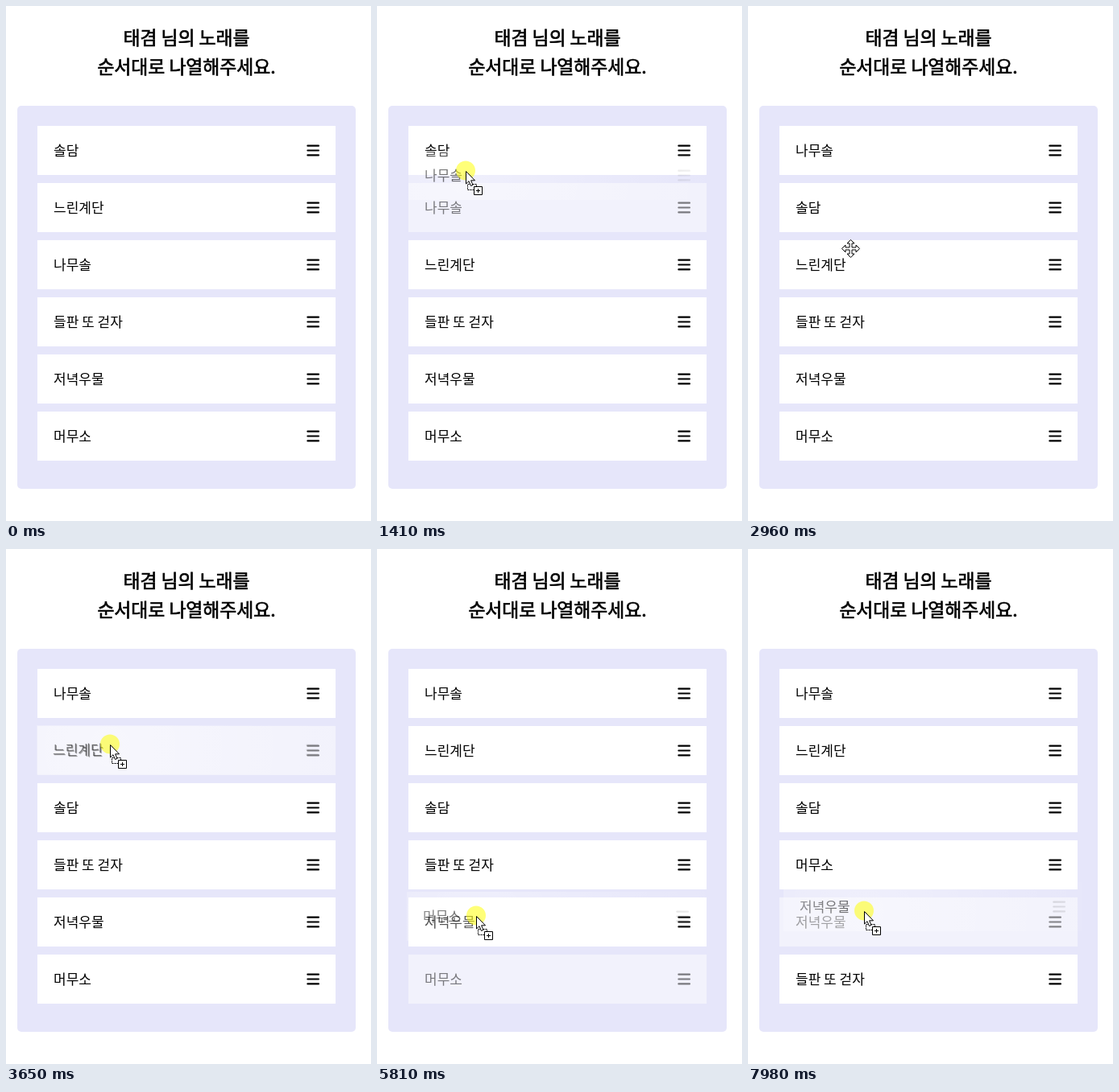
An HTML page with a canvas for the animation above (8 s loop, 453 by 640 pixels).

```html
<!DOCTYPE html>
<html lang="ko">
<head>
<meta charset="utf-8">
<title>노래 순서 정하기</title>
<style>
  html, body { margin: 0; width: 100%; height: 100%; overflow: hidden; background: #fff; }
  canvas { display: block; }
</style>
</head>
<body>
<canvas id="stage" width="453" height="640"></canvas>
<script>
const ctx = document.getElementById('stage').getContext('2d');
const FONT = '"Noto Sans CJK KR", "Noto Sans CJK", "Noto Sans CJK JP", sans-serif';
const LOOP = 8000;
const STEP = 67.4;  // the pointer is sampled at this interval
const LAG = 20;     // the dragged copy trails the pointer
const LIFT = 40;    // from the first pull to the visible drag
const HOLD = 330;   // from the end of a drag to its drop
const ROW = { x: 39, y: 149, w: 370, h: 61, pitch: 71 };
const SONGS = ['솔담', '느린계단', '나무솔', '들판 또 걷자', '저녁우물', '머무소'];

// Pointer moves; `lift` is the row that a move drags along
const ENTRY = { x: 420, y: 645 };
const MOVES = [
  { start: 120, end: 740, x: 110, y: 320 },
  { start: 970, end: 1950, x: 110, y: 164, lift: 2 },
  { start: 2560, end: 3200, x: 130, y: 318 },
  { start: 3400, end: 3780, x: 129, y: 233, lift: 2 },
  { start: 4080, end: 4780, x: 143, y: 382 },
  { start: 4800, end: 5470, x: 125, y: 542 },
  { start: 5630, end: 6210, x: 121, y: 378, lift: 5 },
  { start: 6490, end: 7280, x: 139, y: 541 },
  { start: 7310, end: 8050, x: 144, y: 449, lift: 5 }
];

const rowTop = i => ROW.y + i * ROW.pitch;
const rowMiddle = i => rowTop(i) + ROW.h / 2;
const sampled = t => Math.floor(t / STEP + 0.4) * STEP;
const easeOut = p => 1 - (1 - p) ** 2.2;

function pointerAt(t) {
  let { x, y } = ENTRY;
  for (const move of MOVES) {
    if (t < move.start) break;
    const k = easeOut(Math.min(1, (t - move.start) / (move.end - move.start)));
    x += (move.x - x) * k;
    y += (move.y - y) * k;
  }
  return { x, y };
}

// Replays the drags up to time t; a row moves up when the pointer passes a row's middle
function listAt(t) {
  const songs = [...SONGS];
  let active = null, slot = -1;
  for (const move of MOVES) {
    if (move.lift === undefined) continue;
    if (t < move.start + LIFT) break;
    const { y } = pointerAt(Math.min(sampled(t) - LAG, move.end));
    slot = move.lift;
    while (slot > 0 && y < rowMiddle(slot - 1)) slot--;
    songs.splice(slot, 0, songs.splice(move.lift, 1)[0]);
    active = t < move.end + HOLD ? move : null;
  }
  return { songs, active, slot };
}

function roundBox(x, y, w, h, r, fill) {
  ctx.fillStyle = fill;
  ctx.beginPath();
  ctx.roundRect(x, y, w, h, r);
  ctx.fill();
}

function drawTitle(text, y) {
  ctx.font = '22.8px ' + FONT;
  ctx.textAlign = 'center';
  ctx.fillStyle = ctx.strokeStyle = '#000';
  ctx.lineWidth = 0.7;
  ctx.fillText(text, 224, y);
  ctx.strokeText(text, 224, y);
}

function drawRow(song, x, y, paper, ink) {
  ctx.fillStyle = paper;
  ctx.fillRect(x, y, ROW.w, ROW.h);
  ctx.fillStyle = ink;
  ctx.font = '17px ' + FONT;
  ctx.textAlign = 'left';
  ctx.fillText(song, x + 20, y + 37);
  for (const line of [-1, 0, 1])
    roundBox(x + 334.3, y + 29.4 + line * 5.8, 15.7, 2.2, 1, ink);
}

function fade({ x, y }, rgb, strength) {
  const gradient = ctx.createRadialGradient(x, y, 0, x, y, 320);
  for (let r = 0; r <= 1; r += 0.25)
    gradient.addColorStop(r, `rgba(${rgb},${strength * (1 - r) ** 1.2})`);
  return gradient;
}

function outline(points) {
  ctx.beginPath();
  points.forEach(([x, y]) => ctx.lineTo(x, y));
  ctx.closePath();
  ctx.fillStyle = '#fff';
  ctx.strokeStyle = '#000';
  ctx.lineWidth = 1;
  ctx.fill();
  ctx.stroke();
}

function drawMoveCursor() {
  const arm = [[-1.5, -1.5], [-1.5, -6.5], [-4.5, -6.5], [0, -11], [4.5, -6.5], [1.5, -6.5]];
  const points = [];
  for (let turn = 0; turn < 4; turn++) {
    const c = Math.cos(turn * Math.PI / 2), s = Math.sin(turn * Math.PI / 2);
    arm.forEach(([x, y]) => points.push([x * c - y * s, x * s + y * c]));
  }
  outline(points);
}

function drawDragCursor() {
  ctx.fillStyle = 'rgba(255,255,0,.53)';
  ctx.beginPath();
  ctx.arc(0, -0.5, 12, 0, 7);
  ctx.fill();
  ctx.strokeStyle = '#000';
  ctx.lineWidth = 1;
  ctx.setLineDash([2, 1]);
  ctx.strokeRect(2.5, 16.5, 11, 7);
  ctx.setLineDash([]);
  outline([[0.5, 0.5], [0.5, 16], [4, 12.7], [6.5, 18.5], [9, 17.4], [6.6, 11.8], [11.5, 11.8]]);
  outline([[10.5, 19.5], [20.5, 19.5], [20.5, 29.5], [10.5, 29.5]]);
  ctx.fillStyle = '#000';
  ctx.fillRect(13, 24, 5, 1);
  ctx.fillRect(15, 22, 1, 5);
}

function drawDraggedCopy(song, move, now) {
  const grab = pointerAt(move.start);
  const held = pointerAt(now - LAG);
  drawRow(song,
    Math.round(ROW.x + held.x - grab.x),
    Math.round(rowTop(move.lift) + held.y - grab.y),
    fade(held, '255,255,255', 0.38), fade(held, '0,0,0', 0.6));
}

function draw(t) {
  ctx.fillStyle = '#fff';
  ctx.fillRect(0, 0, 453, 640);
  drawTitle('태겸 님의 노래를', 48);
  drawTitle('순서대로 나열해주세요.', 84);

  roundBox(14, 124, 420, 476, 5, '#e6e6fa');
  const { songs, active, slot } = listAt(t);
  songs.forEach((song, i) => {
    ctx.globalAlpha = active && i === slot ? 0.5 : 1;
    drawRow(song, ROW.x, rowTop(i), '#fff', '#000');
  });
  ctx.globalAlpha = 1;

  const now = sampled(t);
  if (now < MOVES[0].start) return;
  if (active) drawDraggedCopy(songs[slot], active, now);
  const { x, y } = pointerAt(now);
  ctx.save();
  ctx.translate(Math.round(x), Math.round(y));
  if (active) {
    drawDragCursor();
  } else {
    ctx.translate(-0.5, 0.5);
    drawMoveCursor();
  }
  ctx.restore();
}

function tick() {
  draw(performance.now() % LOOP);
  requestAnimationFrame(tick);
}
tick();
</script>
</body>
</html>
```
